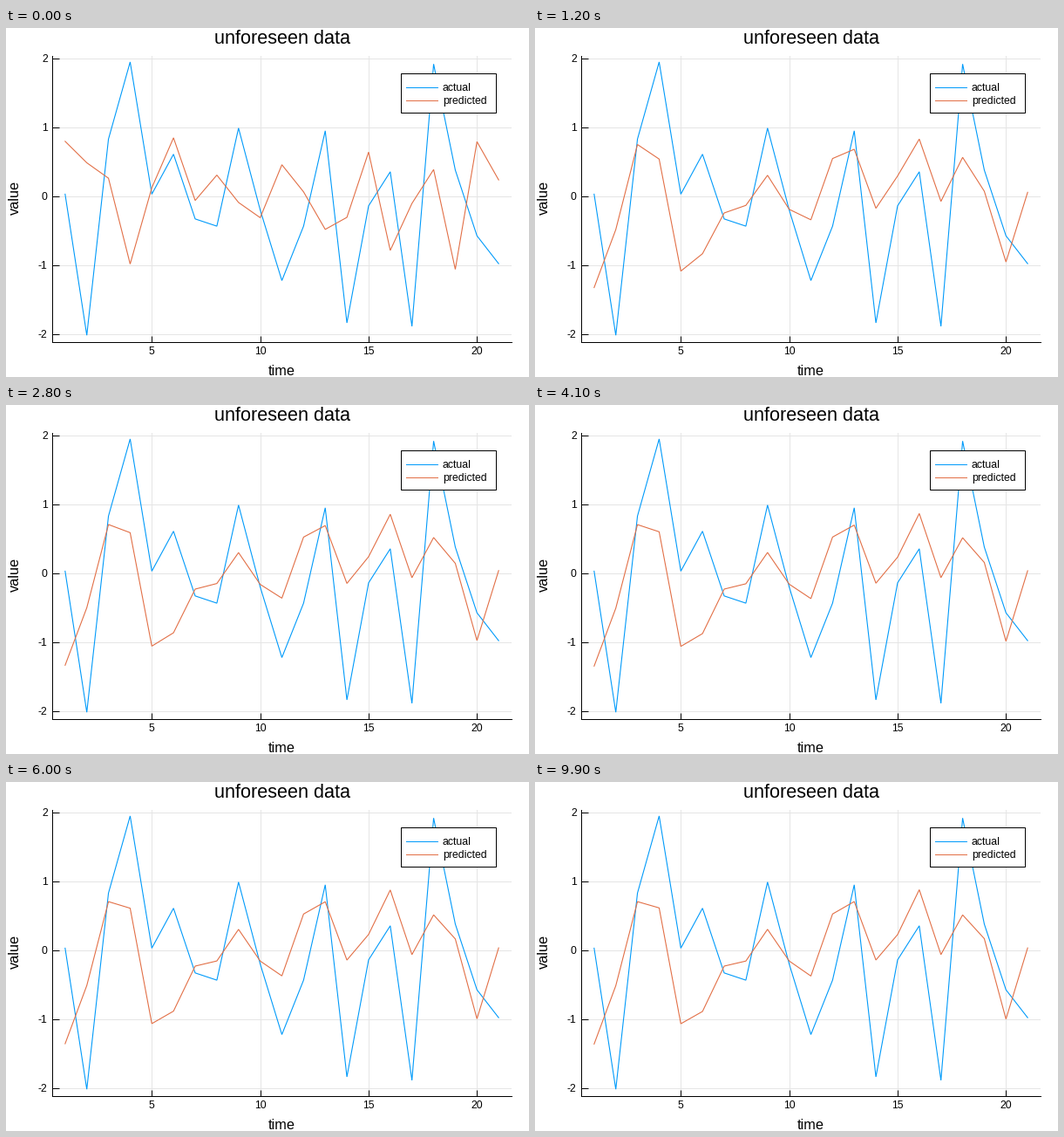
A matplotlib script for the animation above (10 s loop, 600 by 400 pixels).

```python
import matplotlib.pyplot as plt
import numpy as np
from matplotlib.animation import FuncAnimation
from matplotlib.lines import Line2D
from matplotlib.patches import Rectangle

W, H, DPI = 600, 400, 100
PX = 72 / DPI
BLUE, ORANGE = "#009AFA", "#E26F46"
FRAMES, INTERVAL = 100, 100

plt.rcParams["font.family"] = "Liberation Sans"

# Observed series; the first two values only feed the predictor
series = np.array([2.14, 1.12, 0.03, -2.02, 0.83, 1.95, 0.03, 0.61, -0.33, -0.435, 0.99, -0.2,
                   -1.225, -0.435, 0.95, -1.84, -0.14, 0.355, -1.89, 1.92, 0.38, -0.575, -0.98])
actual = series[2:]
time = np.arange(1, len(actual) + 1)


def predict(epoch):
    """Two-lag linear predictor whose weights settle during training."""
    jump = 0.2 ** epoch
    w1 = -0.356 + 0.553 * jump - 0.32 * 0.8 ** epoch
    w2 = -0.451 + 0.836 * jump + 0.052 * np.exp(-epoch / 20)
    return w1 * series[1:-1] + w2 * series[:-2]


def label(x, y, text, size, **kw):
    kw = dict(ha="center", va="baseline") | kw
    fig.text(x / W, 1 - y / H, text, fontsize=size * PX, color="black", **kw)


fig = plt.figure(figsize=(W / DPI, H / DPI), dpi=DPI, facecolor="white")

left, right, top, bottom = 52.9, 580.1, 31.5, 359.5
zero, unit = 192.8, 78.9
ax = fig.add_axes([left / W, 1 - bottom / H, (right - left) / W, (bottom - top) / H])
ax.set_xlim(0.4, 21.6)
ax.set_ylim((zero - bottom) / unit, (zero - top) / unit)
ax.set_xticks(range(5, 21, 5), [])
ax.set_yticks(range(-2, 3), [])
ax.tick_params(direction="in", length=7.5 * PX, width=PX)
ax.grid(color="#e5e5e5", linewidth=PX)
ax.set_axisbelow(True)
ax.spines[["top", "right"]].set_visible(False)
ax.spines[["left", "bottom"]].set_linewidth(PX)

style = dict(linewidth=1.1 * PX, solid_joinstyle="miter")
ax.plot(time, actual, color=BLUE, **style)
curve, = ax.plot(time, predict(0), color=ORANGE, **style)

for t in range(5, 21, 5):
    label(43 + 24.87 * t, 374.5, str(t), 12.2)
for v in range(-2, 3):
    label(47.7, zero + 4.2 - unit * v, str(v), 12.2, ha="right")
label(317, 18.5, "unforeseen data", 21.6)
label(316.7, 398, "time", 16.2)
label(18.3, 194, "value", 16.2, ha="right", va="center", rotation=90)

# Legend in pixel coordinates, above the curves
key = fig.add_axes([0, 0, 1, 1])
key.set(xlim=(0, W), ylim=(H, 0))
key.axis("off")
key.add_patch(Rectangle((452.5, 51.5), 109, 45, facecolor="white", edgecolor="black", linewidth=PX))
for y, color, name in ((67.5, BLUE, "actual"), (82.5, ORANGE, "predicted")):
    key.add_line(Line2D([458.5, 494.5], [y, y], color=color, linewidth=PX))
    key.text(500.7, y + 5, name, fontsize=12.2 * PX, va="baseline")


def update(epoch):
    curve.set_ydata(predict(epoch))
    return curve,


anim = FuncAnimation(fig, update, frames=FRAMES, interval=INTERVAL, repeat=True, repeat_delay=0)
plt.show()
```
